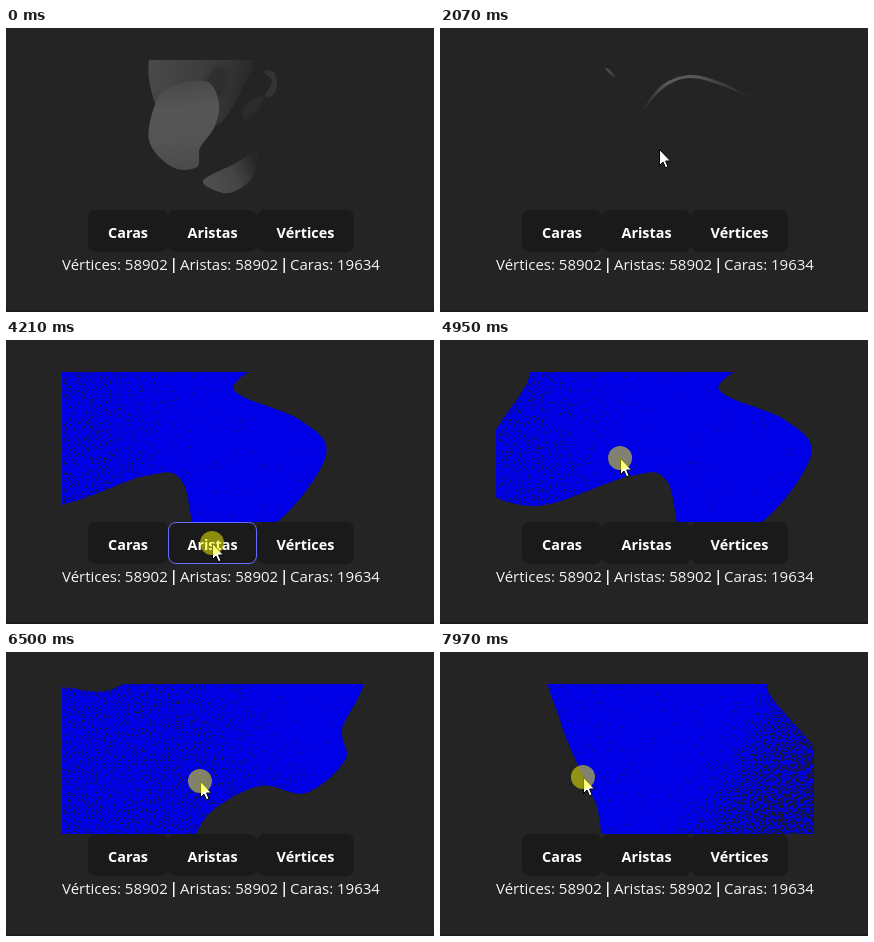
Animation of 428 by 284 pixels, one loop 8000 ms. Source, as an HTML page with a canvas:

```html
<!DOCTYPE html>
<html lang="es">
<head>
<meta charset="utf-8">
<title>Visor de malla</title>
<style>
html, body { margin: 0; width: 100%; height: 100%; overflow: hidden; background: #242424; }
canvas { display: block; }
</style>
</head>
<body>
<canvas id="stage" width="428" height="284"></canvas>
<script>
const ctx = document.getElementById('stage').getContext('2d');
const LOOP = 8000;
const VIEW = { x: 56, y: 32, w: 318, h: 150 };
const FONT = '"Open Sans", "Noto Sans", sans-serif';

const mix = (a, b, k) => a + (b - a) * k;
const ramp = (t, from, to) => Math.min(1, Math.max(0, (t - from) / (to - from)));
const ease = k => k * k * (3 - 2 * k);
const points = text => text.split(' ').map(p => p.split(',').map(Number));
const mixPoints = (a, b, k) => a.map((p, i) => p.map((v, j) => mix(v, b[i][j], k)));

function between(keys, t) {
  let i = 0;
  while (i < keys.length - 2 && t >= keys[i + 1].at) i++;
  const a = keys[i], b = keys[i + 1];
  return [a, b, ramp(t, a.at, b.at)];
}

function random(seed) {
  return () => {
    seed = (Math.imul(seed, 1664525) + 1013904223) >>> 0;
    return seed / 4294967296;
  };
}

// Each outline has twelve key points, so any two of them can be mixed.
const BROW = points('60,10 230,0 400,10 392,56 350,78 333,112 335,155 348,205 190,200 165,172 128,110 111,58');
const WIDE = points('84,49 114,16 298,14 279,50 345,80 371,115 322,182 250,212 227,141 190,136 95,166 36,135');
const SIDE = points('130,50 128,5 400,0 405,60 405,110 400,160 400,205 224,205 213,154 195,135 163,142 138,108');
const LOW = points('30,50 100,39 160,20 347,15 336,78 339,108 300,141 254,134 205,160 170,205 100,215 20,205');
const EDGE = points('112,10 200,-20 318,15 330,43 374,95 400,135 395,205 290,215 179,205 156,152 142,122 120,68');
const BACK = WIDE.map(([x, y]) => [x - 51, y]);

// The mesh opens up along the angle, past the start distance from the view's centre.
const POSES = [
  { at: 3340, outline: BROW, angle: 3.1, start: 20, open: .3 },
  { at: 3760, outline: BACK, angle: 3.1, start: 20, open: .3 },
  { at: 4780, outline: BACK, angle: 3.1, start: 20, open: .3 },
  { at: 4950, outline: WIDE, angle: 3.1, start: 20, open: .3 },
  { at: 5890, outline: SIDE, angle: 0, start: 0, open: .5 },
  { at: 6500, outline: LOW, angle: 2.7, start: -90, open: .3 },
  { at: 7970, outline: EDGE, angle: .5, start: 40, open: .95 },
];

const CURSOR = [
  { at: 130, x: 339, y: 249 },
  { at: 500, x: 203, y: 113 },
  { at: 670, x: 203, y: 113 },
  { at: 1350, x: 262, y: 119 },
  { at: 1800, x: 219, y: 121 },
  { at: 2900, x: 219, y: 121 },
  { at: 3340, x: 230, y: 112 },
  { at: 3560, x: 204, y: 116 },
  { at: 3960, x: 206, y: 203 },
  { at: 4280, x: 206, y: 203 },
  { at: 4680, x: 150, y: 113 },
  { at: 4950, x: 180, y: 118 },
  { at: 5890, x: 240, y: 125 },
  { at: 6500, x: 194, y: 129 },
  { at: 7970, x: 143, y: 125 },
];
const PRESSES = [[500, 1750], [3150, 3600], [4120, 4250], [4700, LOOP]];
const BLUE_FROM = 4180;
const ARROW = points('.5,.5 .5,16.5 4,13 6.5,18.8 9,17.7 6.6,12 11.5,12');

// Smooth closed curve through all points.
function spline(pts) {
  const at = i => pts[(i + pts.length) % pts.length];
  ctx.beginPath();
  ctx.moveTo(...pts[0]);
  pts.forEach((p, i) => {
    const prev = at(i - 1), q = at(i + 1), next = at(i + 2);
    ctx.bezierCurveTo(
      p[0] + (q[0] - prev[0]) / 6, p[1] + (q[1] - prev[1]) / 6,
      q[0] - (next[0] - p[0]) / 6, q[1] - (next[1] - p[1]) / 6, ...q);
  });
}

function blob(text, fill, blur) {
  spline(points(text));
  ctx.filter = `blur(${blur}px)`;
  ctx.fillStyle = fill;
  ctx.fill();
  ctx.filter = 'none';
}

function shade(x0, y0, x1, y1, ...colors) {
  const g = ctx.createLinearGradient(x0, y0, x1, y1);
  colors.forEach((c, i) => g.addColorStop(i / (colors.length - 1), c));
  return g;
}

function layer(alpha, cx, cy, sx, sy, dx, draw) {
  if (alpha <= 0) return;
  ctx.save();
  ctx.globalAlpha = alpha;
  ctx.translate(cx + dx, cy);
  ctx.scale(sx, sy);
  ctx.translate(-cx, -cy);
  draw();
  ctx.restore();
}

function drawHead() {
  blob('150,20 245,20 236,60 213,96 185,90 152,82', shade(150, 40, 245, 60, '#484848', '#404040', '#383838', '#272727'), .5);
  blob('214,38 222,50 214,70 200,54', '#2e2e2e', 2);
  blob('152,70 172,56 202,54 213,76 208,100 194,120 191,139 166,139 143,112',
    shade(170, 52, 178, 143, '#484848', '#565656', '#545454', '#4a4a4a'), .5);
  blob('258,44 266,43 271,52 268,66 259,68 266,53', '#343434', .7);
  blob('240,76 258,68 252,82 238,92', '#2b2b2b', 1);
  blob('197,153 228,136 251,124 247,148 233,161 217,165',
    shade(205, 155, 250, 135, '#4e4e4e', '#444444', '#272727'), .5);
}

function drawRim() {
  blob('203,82 222,57 250,47 280,54 314,71 280,57 250,50 225,59', shade(202, 80, 315, 70, '#2a2a2a', '#5a5a5a', '#585858', '#3c3c3c', '#262626'), .5);
  blob('165,40 170,42 175,49 169,45', '#484848', .4);
}

function drawBrow(outline, detail) {
  ctx.save();
  spline(outline);
  ctx.fillStyle = shade(100, 32, 145, 182, '#4c4c4c', '#525252', '#4a4a4a', '#4e4e4e');
  ctx.fill();
  ctx.clip();
  ctx.globalAlpha *= detail;
  blob('168,125 180,98 230,85 285,100 335,90 300,118 230,104', '#404040', 4);
  blob('180,108 200,95 240,91 288,108 240,100 205,101', '#2a2a2a', 1.5);
  blob('322,108 335,82 376,52 376,66 342,90', '#3a3a3a', 2);
  blob('306,125 330,110 338,184 316,184', '#444444', 3);
  ctx.restore();
}

const CELL = 3.6;
const rnd = random(7);
const gaps = [];
for (let y = 0; y < VIEW.h; y += CELL) {
  for (let x = 0; x < VIEW.w; x += CELL) {
    gaps.push({ x: x + rnd() * 2, y: y + rnd() * 2, chance: rnd(), lean: rnd() - .5, flip: rnd() < .5 ? 1 : -1 });
  }
}

function drawMesh(outline, { angle, start, open }, shift) {
  const dx = Math.cos(angle), dy = Math.sin(angle);
  ctx.save();
  spline(outline);
  ctx.fillStyle = '#0000e6';
  ctx.fill();
  ctx.clip();
  ctx.beginPath();
  for (const gap of gaps) {
    const fx = (gap.x + shift) % VIEW.w;
    const reach = (fx - VIEW.w / 2) * dx + (gap.y - VIEW.h / 2) * dy - start;
    const d = open * mix(.06, 1, ramp(reach, 0, 100));
    if (gap.chance > d * 2.2) continue;
    const x = VIEW.x + fx, y = VIEW.y + gap.y, s = 1.1 + 2.6 * d;
    ctx.moveTo(x, y);
    ctx.lineTo(x + s * 1.2, y + s * gap.lean);
    ctx.lineTo(x + s * (.5 + gap.lean), y + s * gap.flip);
  }
  ctx.fillStyle = '#1a1a2a';
  ctx.fill();
  ctx.restore();
}

function drawModel(t, cursorX) {
  ctx.save();
  ctx.beginPath();
  ctx.rect(VIEW.x, VIEW.y, VIEW.w, VIEW.h);
  ctx.clip();

  const turn = ease(ramp(t, 670, 1500));
  layer(1 - ramp(t, 1000, 1500), 207, 98, 1 - turn * .4, 1, turn * 40, drawHead);
  const rim = ramp(t, 1250, 1600) * (1 - ramp(t, 2340, 2550));
  const sway = ease(ramp(t, 1300, 2000));
  layer(rim, 240, 70, mix(.7, 1, sway), 1, mix(25, 0, sway), drawRim);

  if (t > 2410) {
    const [a, b, k] = between(POSES, t);
    const outline = mixPoints(a.outline, b.outline, k);
    if (t < BLUE_FROM) {
      const zoom = mix(.5, 1, ease(ramp(t, 2410, 3280)));
      layer(ramp(t, 2410, 2750), 230, 60, zoom, zoom, 0,
        () => drawBrow(outline, 1 - .5 * ramp(t, 3400, 3760)));
    } else {
      const spread = {};
      for (const name of ['angle', 'start', 'open']) spread[name] = mix(a[name], b[name], k);
      drawMesh(outline, spread, cursorX * 3);
    }
  }
  ctx.restore();
}

function drawButton(label, x, w, glow = 0) {
  ctx.beginPath();
  ctx.roundRect(x, 182, w, 42, 8);
  ctx.fillStyle = '#1a1a1a';
  ctx.fill();
  if (glow > 0) {
    ctx.beginPath();
    ctx.roundRect(x + .5, 182.5, w - 1, 41, 7.5);
    ctx.strokeStyle = `rgba(100,108,255,${glow})`;
    ctx.lineWidth = 1;
    ctx.stroke();
  }
  ctx.font = `700 14.4px ${FONT}`;
  ctx.textAlign = 'center';
  ctx.fillStyle = '#fff';
  ctx.fillText(label, x + w / 2, 210);
}

function drawPanel(t) {
  drawButton('Caras', 82, 80);
  drawButton('Aristas', 162, 89, ramp(t, 3880, 4130) * (1 - ramp(t, 4330, 4580)));
  drawButton('Vértices', 251, 97);
  ctx.font = `15px ${FONT}`;
  ctx.textAlign = 'left';
  ctx.fillStyle = '#f4f4f4';
  ctx.fillText('Vértices: 58902', 56, 242);
  ctx.fillText('Aristas: 58902', 174, 242);
  ctx.fillText('Caras: 19634', 284, 242);
  for (const x of [167, 277.5]) ctx.fillRect(x, 230, 1.5, 15);
  ctx.fillStyle = '#1e191b';
  ctx.fillRect(0, 282, 428, 2);
}

function drawCursor(t, x, y) {
  if (t < 130) return;
  ctx.beginPath();
  ARROW.forEach(([px, py]) => ctx.lineTo(x + px, y + py));
  ctx.closePath();
  ctx.fillStyle = '#fff';
  ctx.fill();
  ctx.strokeStyle = '#000';
  ctx.lineWidth = 1;
  ctx.stroke();
  if (PRESSES.some(([from, to]) => t >= from && t < to)) {
    ctx.beginPath();
    ctx.arc(x, y, 12, 0, Math.PI * 2);
    ctx.fillStyle = 'rgba(255,255,0,.5)';
    ctx.fill();
  }
}

function draw(t) {
  ctx.fillStyle = '#242424';
  ctx.fillRect(0, 0, 428, 284);
  const [a, b, k] = between(CURSOR, t);
  const x = mix(a.x, b.x, k), y = mix(a.y, b.y, k);
  drawModel(t, x);
  drawPanel(t);
  drawCursor(t, x, y);
}

const begin = performance.now();
function tick() {
  draw((performance.now() - begin) % LOOP);
  requestAnimationFrame(tick);
}
tick();
</script>
</body>
</html>
```
